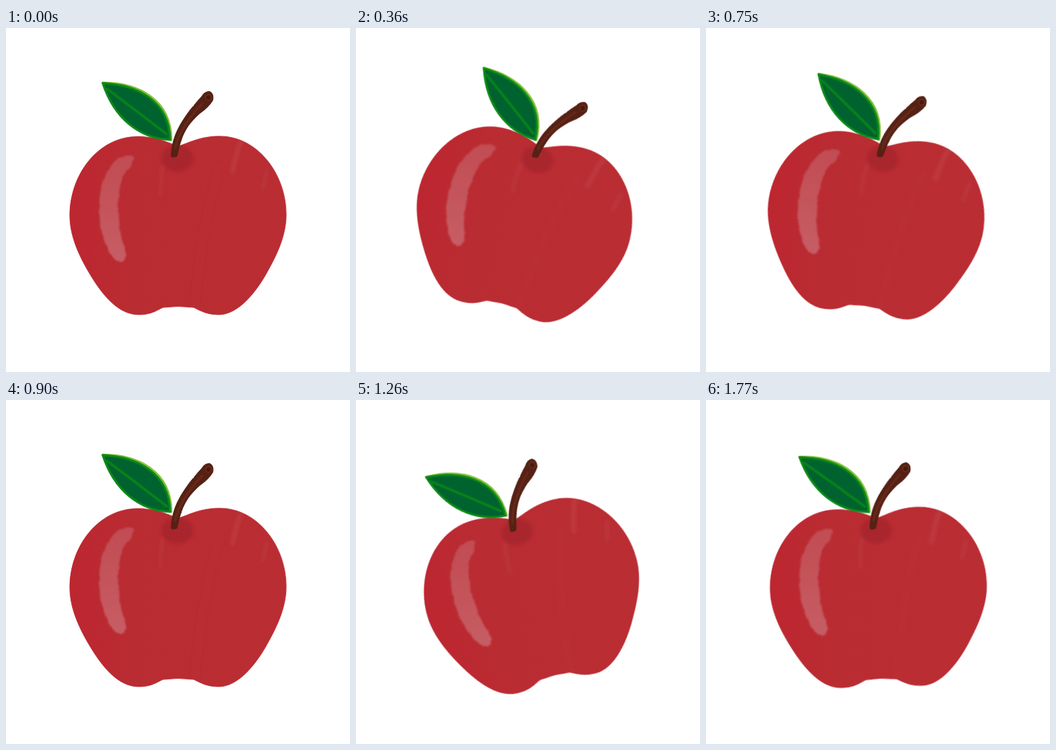
An HTML page that plays this animation: 480 px wide and 480 px high, repeating every 1.8 s.

```html
<!DOCTYPE html>
<html lang="en">
<head>
<meta charset="utf-8">
<title>Swaying apple</title>
<style>
  html, body { margin: 0; width: 100%; height: 100%; overflow: hidden; background: #fff; }
  svg { display: block; width: 100vw; height: 100vh; }
</style>
</head>
<body>
<svg viewBox="0 0 480 480" fill="none" stroke-linecap="round" stroke-linejoin="round">
  <defs>
    <filter id="rough" x="-10%" y="-10%" width="120%" height="120%" color-interpolation-filters="sRGB">
      <feTurbulence type="fractalNoise" baseFrequency=".3" numOctaves="2" seed="4"/>
      <feDisplacementMap in="SourceGraphic" scale="1.6" xChannelSelector="R" yChannelSelector="G"/>
      <feGaussianBlur stdDeviation=".5"/>
    </filter>
    <filter id="brush" x="-20%" y="-10%" width="140%" height="120%" color-interpolation-filters="sRGB">
      <feTurbulence type="fractalNoise" baseFrequency=".13" numOctaves="2" seed="9"/>
      <feDisplacementMap in="SourceGraphic" scale="4" xChannelSelector="R" yChannelSelector="G"/>
      <feGaussianBlur stdDeviation="1"/>
    </filter>
    <filter id="soft" x="-60%" y="-20%" width="220%" height="140%"><feGaussianBlur stdDeviation="2"/></filter>
    <filter id="edge" color-interpolation-filters="sRGB"><feGaussianBlur stdDeviation=".5"/></filter>
    <linearGradient id="skin">
      <stop offset="0" stop-color="#bd2630"/>
      <stop offset=".3" stop-color="#b92c32"/>
      <stop offset="1" stop-color="#b92d33"/>
    </linearGradient>
    <linearGradient id="shine" x1="0" y1="0" x2="0" y2="1">
      <stop offset="0" stop-color="#c24c53"/>
      <stop offset=".5" stop-color="#c4545b"/>
      <stop offset="1" stop-color="#c75e65"/>
    </linearGradient>
    <path id="body" d="M240 165C228 161 212 151.500 184 151.500C128 151.500 89 205 89 262C89 292 104 322 118 345C135 373 157 400 185 400C203 400 210 394 219 390Q240 387 262 390C272 395 281 400 297 400C324 400 348 369 362 345C376 320 391 292 391 260C391 205 352 151 298 151C270 151 254 161 240 165Z"/>
    <clipPath id="inside"><use href="#body"/></clipPath>
  </defs>
  <g id="apple">
    <use href="#body" fill="url(#skin)" stroke="#bc2932" stroke-width=".8" filter="url(#edge)"/>
    <g clip-path="url(#inside)">
      <g filter="url(#soft)" stroke="#cf6a6c">
        <path d="M328 158Q321 175 316 200" stroke-width="7" opacity=".2"/>
        <path d="M364 200L358 224" stroke-width="5" opacity=".15"/>
        <path d="M219 192Q215 210 216 234" stroke-width="5" opacity=".13"/>
        <path d="M298 195Q283 240 274 300T264 385" stroke-width="12" opacity=".04"/>
      </g>
      <ellipse cx="239" cy="182" rx="22" ry="18" fill="#9f242b" opacity=".6" filter="url(#soft)"/>
    </g>
    <path d="M159 180Q169 176 179 179Q178 191 168 199C157 216 155 245 158 267C159 290 164 302 168 317Q166 327 157 327C139 315 130 282 130 250C130 220 142 191 159 180Z" fill="url(#shine)" filter="url(#brush)"/>
    <g filter="url(#rough)">
      <path d="M135 76.500C184 77 230 99 230.500 156" stroke="#86bf3a" stroke-width="3.500"/>
      <path d="M135 77C182 79 228 101 229 156C186 154 151 126 135 77Z" fill="#00632f" stroke="#0b8a16" stroke-width="3"/>
      <path d="M141 85Q184 117 224 148" stroke="#07801b" stroke-width="4"/>
      <path d="M230 179C231 151 243 128 273 95Q277 88 284 88Q291 91 289 101Q283 111 270 120C249 139 245 153 239 179Q234 182 230 179Z" fill="#562114"/>
      <path d="M236 168Q241 141 274 105" stroke="#642919" stroke-width="3"/>
      <circle cx="282.500" cy="97" r="4" fill="#451a10" stroke="#652b1a" stroke-width="2"/>
    </g>
  </g>
</svg>
<script>
  const PERIOD = 1800, SWING = 15, STEP = 30;
  const apple = document.getElementById('apple');

  function draw(ms) {
    const time = Math.floor(ms / STEP) * STEP % PERIOD;
    const angle = SWING * Math.sin(2 * Math.PI * time / PERIOD);
    apple.setAttribute('transform', `rotate(${angle.toFixed(3)} 240 240)`);
  }

  const start = performance.now();
  function tick() {
    draw(performance.now() - start);
    requestAnimationFrame(tick);
  }
  tick();
</script>
</body>
</html>
```
